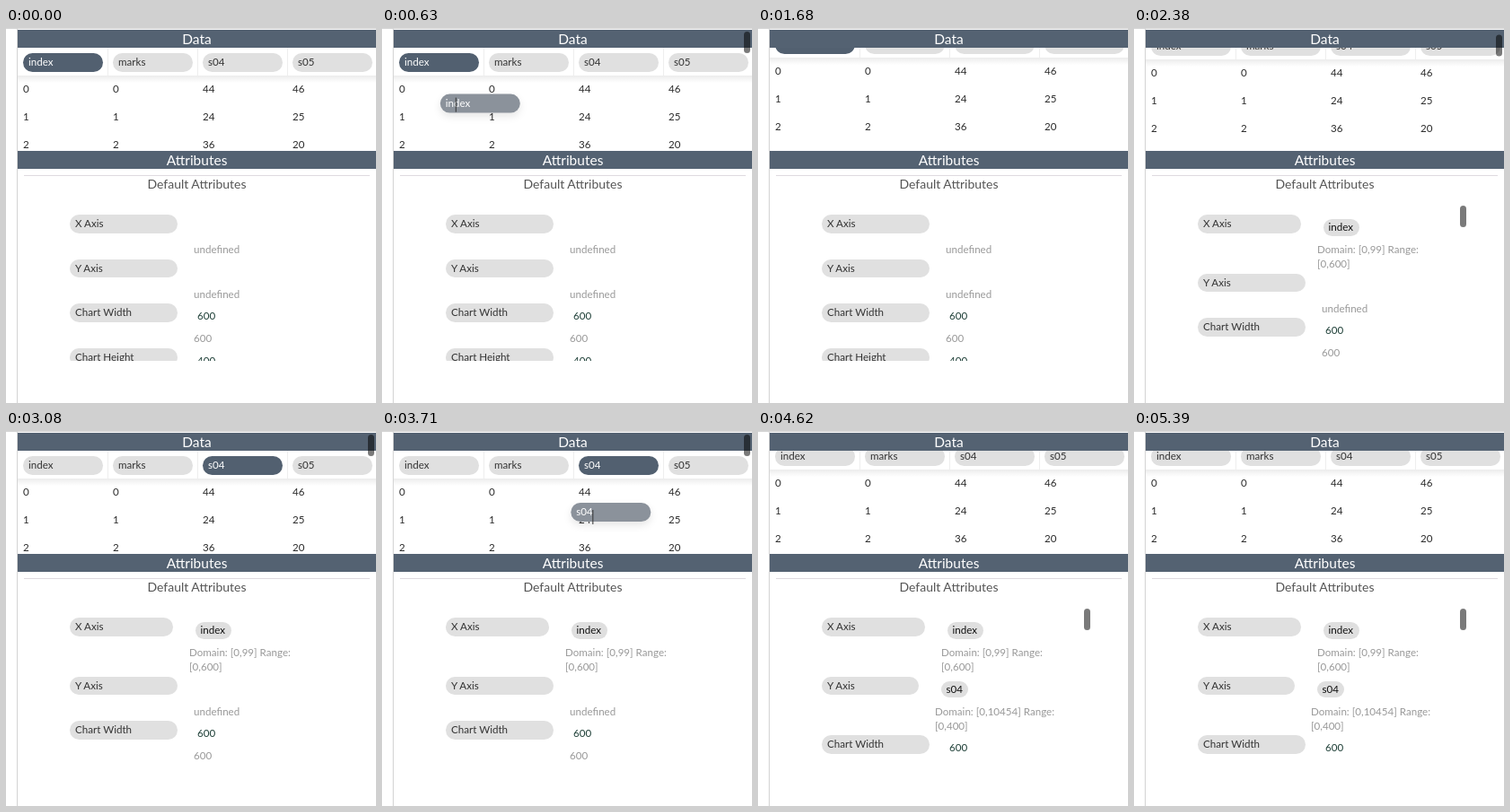
An HTML page for the animation above (5810 ms loop, 412x418 px).

```html
<!DOCTYPE html>
<html lang="en">
<head>
<meta charset="utf-8">
<title>Drag columns to attributes</title>
<style>
  html, body { margin: 0; width: 100%; height: 100%; overflow: hidden; background: #fff; }
  #stage { position: relative; width: 412px; height: 418px; overflow: hidden;
    font: 11.6px Lato, "Open Sans", sans-serif; color: #2b2b2b; }
  #stage div { position: absolute; white-space: nowrap; box-sizing: border-box; }
  .title { background: #546272; color: #fff; text-align: center; font-size: 15.5px; }
  .heading { text-align: center; font-size: 14px; color: #555; }
  .pill { background: #e0e0e0; border-radius: 11px; padding-left: 6px; color: #333; }
  .chip { background: #dfdfdf; border-radius: 10px; padding-left: 5.5px; color: #111; }
  .hot { background: #526070; color: #fff; }
  .note { color: #999; }
  .value { color: #1f4038; }
  .line { background: #d4d4d4; }
  .sep { background: #eee; }
  .rule { background: #dfdae0; }
  .shade { background: linear-gradient(#ececec, #fff); }
  .clip { overflow: hidden; }
  .bar { background: rgba(0, 0, 0, .52); border-radius: 3.5px; }
  .ghost { background: #8b929b; color: #fff; box-shadow: 0 4px 10px rgba(0, 0, 0, .1); }
  .caret { background: #333; }
</style>
</head>
<body>
<div id="stage"></div>
<script>
const STEP = 70, LOOP = 5810;
const stage = document.getElementById('stage');

function box(parent, cls, x, y, w, h, text = '') {
  const el = document.createElement('div');
  el.className = cls;
  el.textContent = text;
  Object.assign(el.style, {
    left: x + 'px', top: y + 'px', width: w + 'px', height: h + 'px', lineHeight: h + 'px'
  });
  parent.append(el);
  return el;
}

const linked = [];
function link(name, el) {
  linked.push({ name, el });
}

// Data table
const tableView = box(stage, 'clip', 13, 22, 399, 115);
const table = box(tableView, '', 0, 0, 399, 200);
const columns = {
  index: [0, 1, 2, 3],
  marks: [0, 1, 2, 3],
  s04: [44, 24, 36, 50],
  s05: [46, 25, 20, 10]
};
box(table, 'shade', 0, 31, 399, 8);
Object.entries(columns).forEach(([name, cells], i) => {
  const x = 6 + i * 100;
  link(name, box(table, 'pill', x, 6, 89, 20.5, name));
  if (i) box(table, 'sep', x - 6, 0, 1, 31);
  cells.forEach((cell, row) => box(table, '', x, 36 + row * 31, 60, 20, cell));
});

box(stage, 'line', 12, 0, 1, 418);
box(stage, 'line', 0, 0, 412, 1);
box(stage, 'title', 13, 2, 399, 20, 'Data');

// Attribute panel
box(stage, 'title', 13, 137, 399, 20, 'Attributes');
box(stage, 'rule', 20, 164, 385, 1);
box(stage, 'heading', 13, 164, 399, 20, 'Default Attributes');

const xSet = { chip: 'index', x: 211, w: 39.5, pill: 115, note: ['Domain: [0,99] Range:', '[0,600]'] };
const ySet = { chip: 's04', x: 204, w: 29.5, pill: 108, note: ['Domain: [0,10454] Range:', '[0,400]'] };

function pane(xAxis, yAxis) {
  const view = box(stage, 'clip', 0, 186, 412, 185);
  const rows = [
    ['X Axis', xAxis], ['Y Axis', yAxis],
    ['Chart Width', { value: '600' }], ['Chart Height', { value: '400' }]
  ];
  let y = 22;
  for (const [label, set] of rows) {
    const { chip, value, x = 216, w, pill = 120, note = [value || 'undefined'] } = set || {};
    box(view, 'pill', 71, y, pill, 20.5, label);
    if (chip) link(chip, box(view, 'chip', x, y + 5, w, 18.5, chip));
    if (value) box(view, 'value', 213, y + 4, 60, 20, value);
    note.forEach((text, i) => box(view, 'note', x - 7, y + 29 + i * 16, 160, 20, text));
    y += chip ? 65.6 : 49.5;
  }
  return view;
}
const panes = [pane(), pane(xSet), pane(xSet, ySet)];

// Overlays
const tableBar = box(stage, 'bar', 403, 4, 7, 24);
const paneBar = box(stage, 'bar', 363, 198, 7, 24);
const ghost = box(stage, 'pill ghost', 0, 0, 89, 20.5);
const caret = box(stage, 'caret', 0, 0, 1, 16);

// Tracks: [time, value], linear between entries
const scrollTrack = [[630, 0], [1050, 20], [2310, 20], [2380, 18], [2450, 10], [2520, 3], [2590, 0],
  [3710, 0], [3990, 10]];
const tableBarTrack = [[560, 0], [630, 1], [1190, 1], [1400, 0], [2310, 0], [2380, 1], [4200, 1], [4410, 0]];
const paneBarTrack = [[1750, 0], [1820, 1], [2380, 1], [2590, 0], [4550, 0], [4620, 1]];

const drags = [
  { name: 'index', from: 490, to: 1680, dx: 17, dy: 4,
    x: [[420, 19], [560, 38], [910, 172], [1050, 196], [1190, 196], [1400, 198.5]],
    y: [[420, 28], [560, 46], [910, 184], [1050, 210], [1190, 210], [1400, 212]] },
  { name: 's04', from: 3640, to: 4550, dx: 24, dy: 8,
    x: [[3570, 219], [3780, 206], [3990, 189], [4200, 203], [4410, 204]],
    y: [[3570, 28], [3710, 80], [3850, 210], [3990, 272], [4200, 280], [4410, 281]] }
];
const hovers = [
  ['index', 0, 1890], ['s04', 3080, 3780], ['s04', 5040, 5180], ['index', 5320, 5390]
];

function at(track, t) {
  const i = track.findIndex(([time]) => time >= t);
  if (i < 0) return track[track.length - 1][1];
  if (i === 0) return track[0][1];
  const [t0, a] = track[i - 1], [t1, b] = track[i];
  return a + (b - a) * (t - t0) / (t1 - t0);
}

function move(el, x, y) {
  el.style.transform = `translate(${x}px, ${y}px)`;
}

function show(el, on) {
  el.style.visibility = on ? 'visible' : 'hidden';
}

function draw(t) {
  const scroll = at(scrollTrack, t);
  move(table, 0, -scroll);
  move(tableBar, 0, scroll * .2);
  tableBar.style.opacity = at(tableBarTrack, t);
  paneBar.style.opacity = at(paneBarTrack, t);

  const current = t < 1820 ? 0 : t < 4550 ? 1 : 2;
  panes.forEach((el, i) => show(el, i === current));

  const hover = hovers.find(([, from, to]) => t >= from && t < to);
  for (const { name, el } of linked) el.classList.toggle('hot', !!hover && hover[0] === name);

  const drag = drags.find(d => t >= d.from && t < d.to);
  show(ghost, drag);
  show(caret, drag);
  if (drag) {
    const x = at(drag.x, t), y = at(drag.y, t);
    ghost.textContent = drag.name;
    move(ghost, x, y);
    move(caret, x + drag.dx, y + drag.dy);
  }
}

const start = performance.now();
function tick() {
  const t = (performance.now() - start) % LOOP;
  draw(Math.floor(t / STEP) * STEP);
  requestAnimationFrame(tick);
}
tick();
</script>
</body>
</html>
```
